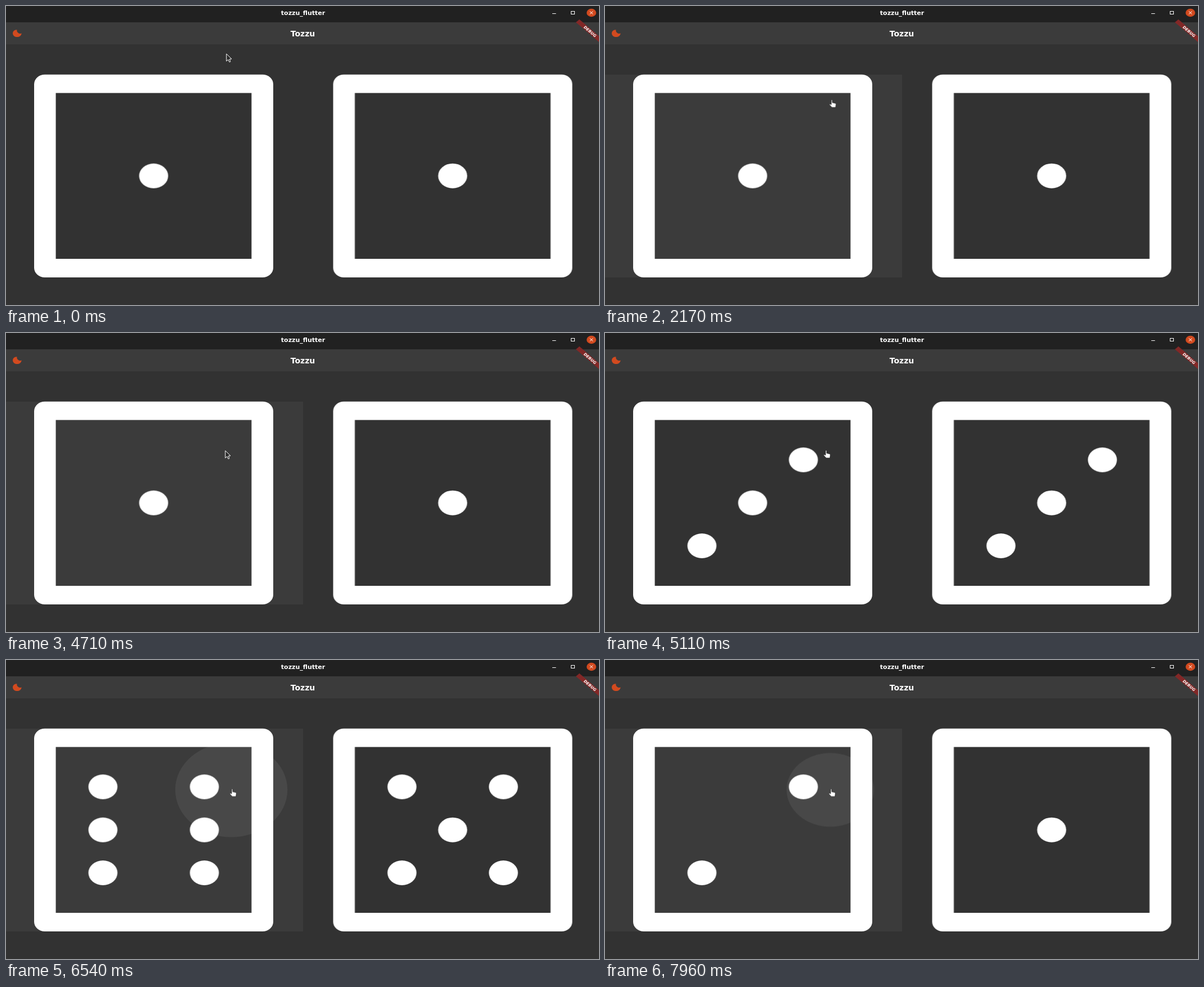
These frames come from a looping animation (1054 px wide and 531 px high, 8 s). An HTML page:

```html
<!DOCTYPE html>
<html lang="en">
<head>
<meta charset="utf-8">
<title>Tozzu</title>
<style>
  html, body { margin: 0; width: 100%; height: 100%; overflow: hidden; background: #323232; }
  svg { display: block; width: 1054px; height: 531px; }
  text { fill: #fff; font-family: "DejaVu Sans", "Noto Sans", sans-serif; font-weight: 700; text-anchor: middle; }

  .hover { fill: #3b3b3b; }
  .pip { fill: #fff; }
  .ripple { fill: #fff; fill-opacity: .07; }
  .hover, .pip, .arrow, .hand { animation: 8s step-end infinite; }

  /* Button hover */
  .hover.left { animation-name: hover-left; }
  .hover.right { animation-name: hover-right; }
  @keyframes hover-left {
    0% { opacity: 0 } 16.25% { opacity: 1 } 34.75% { opacity: 0 }
    47.4% { opacity: 1 } 63.875% { opacity: 0 } 78.875%, 100% { opacity: 1 }
  }
  @keyframes hover-right {
    0% { opacity: 0 } 34.75% { opacity: 1 } 47.4%, 100% { opacity: 0 }
  }

  /* Rolls: 1-1, 4-5, 3-3, 6-5, 2-1 */
  .corner { animation-name: corner; }
  .left .diagonal { animation-name: diagonal-left; }
  .right .diagonal { animation-name: diagonal-right; }
  .left .center { animation-name: center; }
  .side { animation-name: side; }
  .right .side { display: none; }
  @keyframes corner {
    0% { opacity: 0 } 59.625% { opacity: 1 } 63.875% { opacity: 0 }
    81.75% { opacity: 1 } 99.5%, 100% { opacity: 0 }
  }
  @keyframes diagonal-left { 0% { opacity: 0 } 59.625%, 100% { opacity: 1 } }
  @keyframes diagonal-right {
    0% { opacity: 0 } 59.625% { opacity: 1 } 99.5%, 100% { opacity: 0 }
  }
  @keyframes center {
    0% { opacity: 1 } 59.625% { opacity: 0 } 63.875% { opacity: 1 } 81.75%, 100% { opacity: 0 }
  }
  @keyframes side {
    0% { opacity: 0 } 81.75% { opacity: 1 } 99.5%, 100% { opacity: 0 }
  }

  /* Tap ripple */
  .ripple { transform-origin: 400.5px 230.5px; animation: ripple 8s linear infinite; }
  @keyframes ripple {
    0%, 80% { transform: scale(0) }
    81.75%, 95.12% { transform: scale(1) }
    95.125%, 98.1% { transform: scale(0) }
    99.5%, 100% { transform: scale(.78) }
  }

  /* Pointer */
  .pointer { animation: travel 8s linear infinite; }
  @keyframes travel {
    0%, 14% { transform: translate(390px, 84px) }
    15.6% { transform: translate(400px, 108px) }
    17% { transform: translate(399px, 148px) }
    18.5% { transform: translate(340px, 228px) }
    20.25% { transform: translate(250px, 267px) }
    21.6% { transform: translate(300px, 243px) }
    24%, 24.375% { transform: translate(399px, 157px) }
    27.125% { transform: translate(398px, 166px) }
    30.5% { transform: translate(440px, 187px) }
    34.375%, 34.75% { transform: translate(525px, 201px) }
    37.875%, 43.625% { transform: translate(578px, 205px) }
    47% { transform: translate(524px, 202px) }
    53.375%, 55.9% { transform: translate(387px, 207px) }
    56.25% { transform: translate(382px, 202px) }
    56.75%, 69.875% { transform: translate(388px, 208px) }
    75.125%, 100% { transform: translate(397px, 228.5px) }
  }
  .arrow { animation-name: arrow; }
  .hand { animation-name: hand; }
  @keyframes arrow {
    0% { opacity: 1 } 16.25% { opacity: 0 }
    58.875% { opacity: 1 } 59.625% { opacity: 0 }
    61.75% { opacity: 1 } 63.875% { opacity: 0 }
    78.875% { opacity: 1 } 81.75% { opacity: 0 }
    95.125% { opacity: 1 } 96.25% { opacity: 0 }
    98.125% { opacity: 1 } 99.5%, 100% { opacity: 0 }
  }
  @keyframes hand {
    0% { opacity: 0 } 16.25% { opacity: 1 }
    58.875% { opacity: 0 } 59.625% { opacity: 1 }
    61.75% { opacity: 0 } 63.875% { opacity: 1 }
    78.875% { opacity: 0 } 81.75% { opacity: 1 }
    95.125% { opacity: 0 } 96.25% { opacity: 1 }
    98.125% { opacity: 0 } 99.5%, 100% { opacity: 1 }
  }
</style>
</head>
<body>
<svg viewBox="0 0 1054 531">
  <defs>
    <ellipse id="dot" rx="25.8" ry="22"/>
    <g id="frame">
      <path fill="#fff" fill-rule="evenodd" d="M69 121.8H456A19 17 0 0 1 475 138.8V465A19 17 0 0 1 456 482H69A19 17 0 0 1 50 465V138.8A19 17 0 0 1 69 121.8ZM88.5 154.4V449H436.4V154.4Z"/>
    </g>
    <clipPath id="button"><rect y="122" width="528" height="360"/></clipPath>
  </defs>

  <rect width="1054" height="531" fill="#323232"/>

  <!-- Window title bar -->
  <rect width="1054" height="29" fill="#212121"/>
  <text x="528" y="16" font-size="11">tozzu_flutter</text>
  <path d="M971 13.5H977.5" stroke="#fff"/>
  <rect x="1004.5" y="9.5" width="6" height="5" fill="none" stroke="#fff"/>
  <ellipse cx="1040.5" cy="12" rx="8.5" ry="7.2" fill="#d24a1f"/>
  <path d="M1037.7 9.4L1043.3 14.6M1043.3 9.4L1037.7 14.6" stroke="#fff"/>

  <!-- App bar -->
  <rect y="29" width="1054" height="39" fill="#3b3b3b"/>
  <path fill="#d24a1f" d="M19.5 42.2C9.6 41.8 9.5 55 19.8 55C25 55 27.6 51.5 27.6 48.2Q25.5 49.8 22.8 48.6Q18.5 46 19.5 42.2Z"/>
  <text x="527.5" y="54" font-size="14">Tozzu</text>
  <g transform="matrix(.513 .438 -.513 .438 1054 29)">
    <rect x="-40" y="28" width="80" height="12" fill="#822827"/>
    <text x="3" y="37.7" font-size="10.2">DEBUG</text>
  </g>

  <!-- Dice -->
  <rect class="hover left" y="122" width="528" height="360"/>
  <rect class="hover right" x="528" y="122" width="526" height="360"/>
  <g clip-path="url(#button)">
    <ellipse class="ripple" cx="400.5" cy="230.5" rx="99.7" ry="84"/>
  </g>
  <g id="left" class="left">
    <use href="#frame"/>
    <use class="pip corner" href="#dot" x="172.3" y="225.3"/>
    <use class="pip corner" href="#dot" x="352.6" y="378"/>
    <use class="pip diagonal" href="#dot" x="352.6" y="225.3"/>
    <use class="pip diagonal" href="#dot" x="172.3" y="378"/>
    <use class="pip center" href="#dot" x="262.4" y="301.7"/>
    <use class="pip side" href="#dot" x="172.3" y="301.7"/>
    <use class="pip side" href="#dot" x="352.6" y="301.7"/>
  </g>
  <g class="right" transform="translate(531.5)">
    <use href="#frame"/>
    <use class="pip corner" href="#dot" x="172.3" y="225.3"/>
    <use class="pip corner" href="#dot" x="352.6" y="378"/>
    <use class="pip diagonal" href="#dot" x="352.6" y="225.3"/>
    <use class="pip diagonal" href="#dot" x="172.3" y="378"/>
    <use class="pip center" href="#dot" x="262.4" y="301.7"/>
  </g>

  <g class="pointer">
    <path class="arrow" fill="#2b2b2b" stroke="#fff" d="M1.8 1V14L4.9 11.2L7 15.6L9 14.7L7.2 10.4L11 10Z"/>
    <path class="hand" fill="#fff" stroke="#222" stroke-width=".8" d="M4 1.3C4 .2 6 .2 6 1.3V5.5L11 6.6Q12.6 7 12.4 8.5L11.8 14H5.2L.8 9.3Q.5 7.7 2 7.8L4 9.1Z"/>
  </g>
</svg>
</body>
</html>
```
